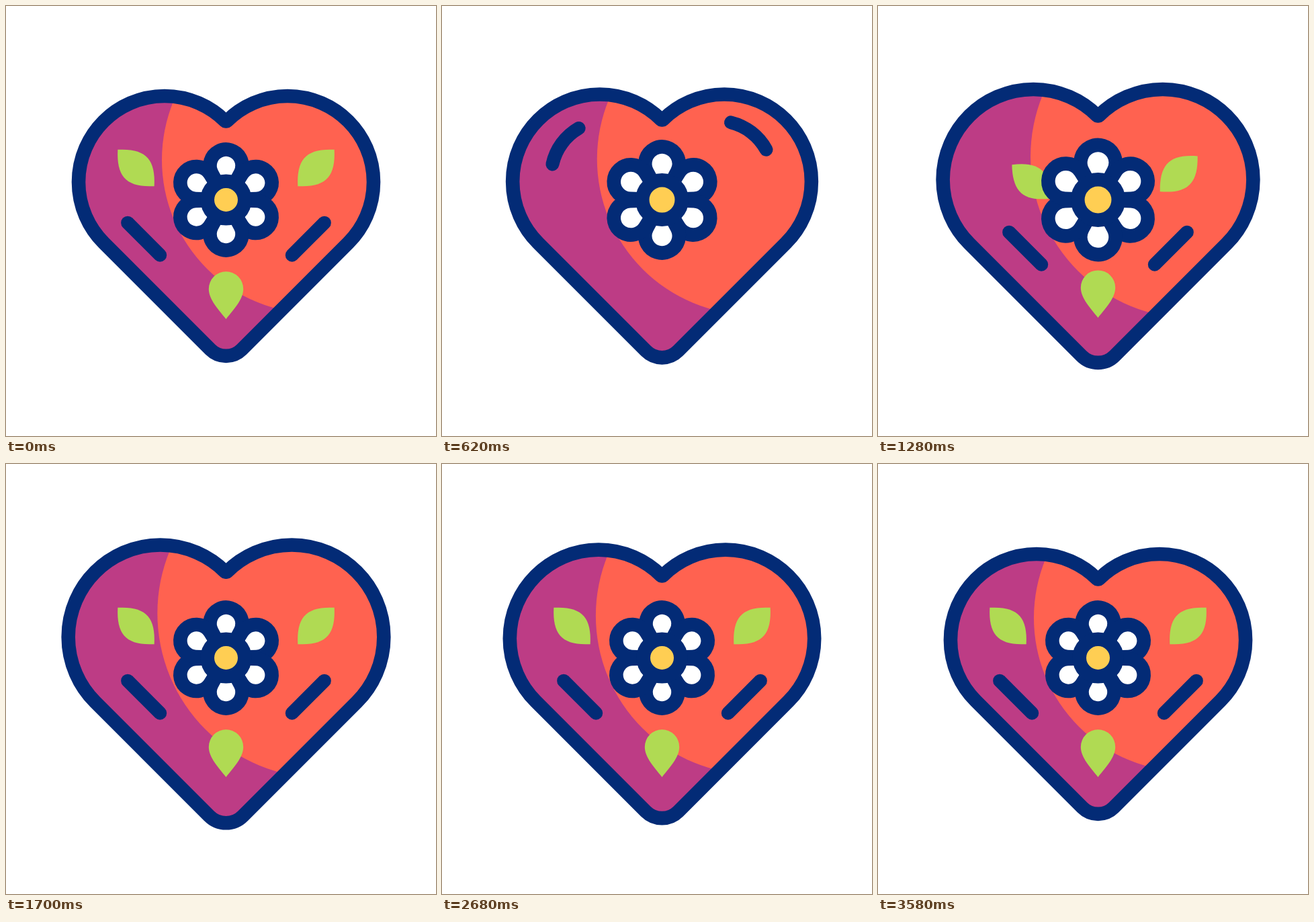
Write an HTML page with a canvas that moves like this. It is 640 px wide and 640 px high and loops after 3.6 s.

```html
<!DOCTYPE html>
<html lang="en">
<head>
<meta charset="utf-8">
<title>Heart</title>
<style>
html, body { margin: 0; width: 100%; height: 100%; overflow: hidden; background: #fff; }
canvas { display: block; width: 640px; height: 640px; }
</style>
</head>
<body>
<canvas id="stage" width="640" height="640"></canvas>
<script>
const ctx = document.getElementById('stage').getContext('2d');
const LOOP = 3600, MID = 327.5, FLOWER_Y = 288.5, LINE = 20.6;
const NAVY = '#032b76', PURPLE = '#bd3c85', CORAL = '#ff6250';
const GREEN = '#b0da53', YELLOW = '#ffce53', WHITE = '#fff';
const rad = deg => deg * Math.PI / 180;
const clamp = x => Math.min(1, Math.max(0, x));
const smooth = x => { x = clamp(x); return x * x * (3 - 2 * x); };

function along(points, x) {
  for (let i = 1; i < points.length; i++) {
    const [x0, y0] = points[i - 1], [x1, y1] = points[i];
    if (x <= x1) return y0 + (y1 - y0) * (x - x0) / (x1 - x0);
  }
  return 0;
}

// Heart: seven quick beats, each followed by a slow release
const BEAT = 455, FIRST = 295, RISE = 125;
const RELEASE = [[0, 1], [25, .95], [75, .64], [110, .4], [155, .355], [220, .28], [325, .16], [430, .06], [565, 0]];
function heartBeat(t) {
  if (t < FIRST) return smooth((t - FIRST + 190) / 190);
  const n = Math.min(6, Math.floor((t - FIRST) / BEAT));
  const since = t - FIRST - n * BEAT;
  const base = along(RELEASE, since);
  if (n === 6) return base;
  return base + (1 - base) * smooth((since - BEAT + RISE) / RISE);
}

function flowerBeat(t) {
  const p = t % 940;
  const swell = smooth((p - 180) / 160);
  const fall = 1 - smooth((p - 540) / 220);
  return swell * fall * (1 - .13 * clamp((p - 340) / 100));
}

function withScale(x, y, s, trace) {
  ctx.save();
  ctx.translate(x, y);
  ctx.scale(s, s);
  trace();
  ctx.restore();
}

function disc(x, y, r, color) {
  ctx.beginPath();
  ctx.arc(x, y, r, 0, rad(360));
  ctx.fillStyle = color;
  ctx.fill();
}

function outline(width = LINE) {
  ctx.strokeStyle = NAVY;
  ctx.lineWidth = width;
  ctx.lineJoin = ctx.lineCap = 'round';
  ctx.stroke();
}

function traceHeart() {
  ctx.beginPath();
  ctx.arc(-91.5, -65.5, 128, rad(135), rad(315));
  ctx.arc(91.5, -65.5, 128, rad(225), rad(45));
  ctx.arcTo(0, 207, -60, 147, 33);
  ctx.closePath();
}

function drawHeart(t) {
  const s = 1 + .082 * heartBeat(t);
  withScale(MID, MID, s, traceHeart);
  ctx.save();
  ctx.fillStyle = PURPLE;
  ctx.fill();
  ctx.clip();
  withScale(MID, MID, s, () => disc(133.5, -98.5, 229, CORAL));
  ctx.restore();
  withScale(MID, MID, s, traceHeart);
  outline();
}

// Bars run up the sides, over the lobes and come back from the tip
const BAR = 68, BAR_REST = 139, RETURN = 930;
function barStart(t, reach) {
  if (t < RETURN) return BAR_REST + reach * (t / 620) ** 2;
  return BAR_REST - 214 * (1 - clamp((t - RETURN) / 641)) ** 3;
}

function drawBar(t, side, reach) {
  ctx.save();
  ctx.translate(MID, 0);
  ctx.scale(side, 1);
  ctx.beginPath();
  ctx.moveTo(0, 469);
  ctx.lineTo(149.5, 319.5);
  ctx.bezierCurveTo(167, 300, 167, 272, 164.6, 244.5);
  ctx.arc(83, 253, 82, rad(-6), rad(-180), true);
  ctx.setLineDash([BAR, 9999]);
  ctx.lineDashOffset = -barStart(t, reach);
  outline(20);
  ctx.restore();
}

// Share of the way back to the flower: 0 at rest, 1 hidden
function retreat(t, leave, enter) {
  if (t < enter) return clamp((t - leave) / 450) ** 3;
  return (1 - clamp((t - enter) / 500)) ** 3;
}

function drawSideLeaf(side, away) {
  ctx.save();
  ctx.translate(MID, FLOWER_Y);
  ctx.scale(side, 1);
  ctx.rotate(rad(15 * away));
  ctx.translate(134 * (1 - away), -47.5 * (1 - away));
  ctx.rotate(rad(-45));
  ctx.beginPath();
  ctx.moveTo(38.4, 0);
  ctx.bezierCurveTo(11, 30.4, -11, 30.4, -38.4, 0);
  ctx.bezierCurveTo(-11, -30.4, 11, -30.4, 38.4, 0);
  ctx.fillStyle = GREEN;
  ctx.fill();
  ctx.restore();
}

function drawLowerLeaf(away) {
  ctx.save();
  ctx.translate(MID, 421 - 141 * away);
  ctx.beginPath();
  ctx.arc(0, 0, 25.7, rad(180), 0);
  ctx.bezierCurveTo(25.7, 16, 11, 31, 0, 45);
  ctx.bezierCurveTo(-11, 31, -25.7, 16, -25.7, 0);
  ctx.fillStyle = GREEN;
  ctx.fill();
  ctx.restore();
}

function drawFlower(t) {
  const s = 1 + .088 * flowerBeat(t);
  for (let i = 0; i < 6; i++) {
    withScale(MID, FLOWER_Y, s, () => {
      ctx.rotate(rad(60 * i));
      ctx.beginPath();
      ctx.moveTo(0, 0);
      ctx.arc(0, -51, 24, rad(152), rad(28));
      ctx.closePath();
    });
    ctx.fillStyle = WHITE;
    ctx.fill();
    outline();
  }
  disc(MID, FLOWER_Y, 27.8 * s, YELLOW);
  outline();
}

function draw(t) {
  ctx.fillStyle = WHITE;
  ctx.fillRect(0, 0, 640, 640);
  drawHeart(t);
  drawBar(t, -1, 160);
  drawBar(t, 1, 183);
  drawLowerLeaf(retreat(t, 0, 900));
  drawSideLeaf(1, retreat(t, 60, 1022));
  drawSideLeaf(-1, retreat(t, 120, 1107));
  drawFlower(t);
}

const began = performance.now();
function tick() {
  draw((performance.now() - began) % LOOP);
  requestAnimationFrame(tick);
}
tick();
</script>
</body>
</html>
```
